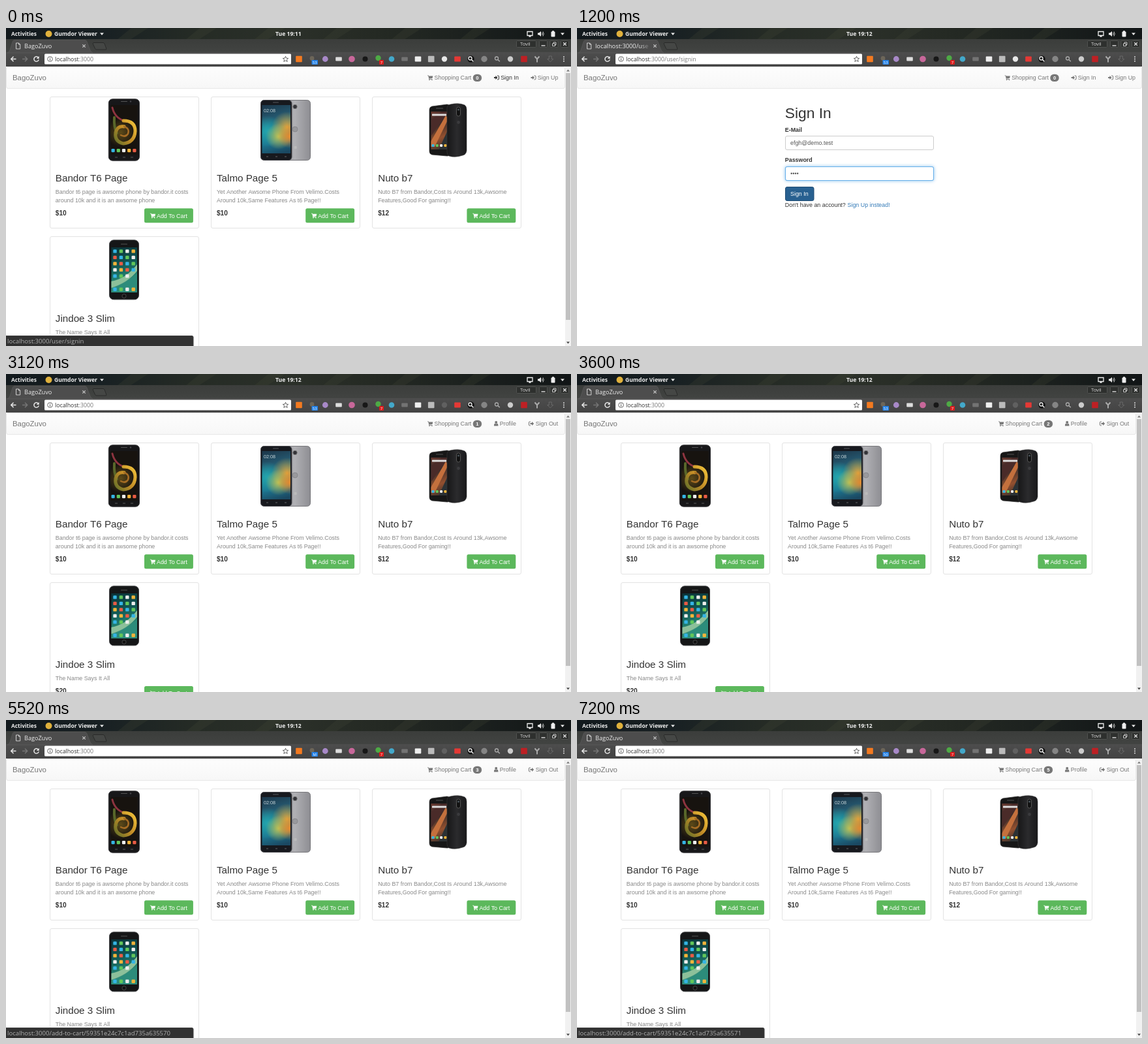
These frames come from a looping animation (866x487 px, 8 s). An HTML page with a canvas:

```html
<!DOCTYPE html>
<html lang="en">
<head>
<meta charset="utf-8">
<title>BagoZuvo</title>
<style>
  html, body { margin: 0; width: 100%; height: 100%; overflow: hidden; background: #fff; }
  canvas { display: block; }
</style>
</head>
<body>
<canvas id="stage" width="866" height="487"></canvas>
<script>
const c = document.getElementById('stage').getContext('2d');
const SANS = '"Liberation Sans", Arial, sans-serif';
const UI = '"Open Sans", "Noto Sans", sans-serif';
const LOOP = 8000, STEP = 1200;
const ADD = '/add-to-cart/59351e24c7c1ad735a63557';

const states = [
  { cart: 0, clock: '19:11', badge: '53', status: '/user/signin', hover: true },
  { cart: 0, clock: '19:12', badge: '53', form: true },
  { cart: 1, clock: '19:12', badge: '53', user: true },
  { cart: 2, clock: '19:12', badge: '53', user: true },
  { cart: 3, clock: '19:12', badge: 'M', user: true, status: ADD + '0' },
  { cart: 4, clock: '19:12', badge: '51', user: true },
  { cart: 5, clock: '19:12', badge: '50', user: true, status: ADD + '1' }
];

function text(s, x, y, size = 8.88, color = '#333', weight = 400, family = SANS) {
  c.font = `${weight} ${size}px ${family}`;
  c.fillStyle = color;
  c.fillText(s, x, y);
}
const ui = (s, x, y, size, color, weight) => text(s, x, y, size, color, weight, UI);

function box(x, y, w, h, r, fill, stroke) {
  c.beginPath();
  c.roundRect(x, y, w, h, r);
  paint(fill, stroke);
}
function dot(x, y, r, fill, stroke, width) {
  c.beginPath();
  c.arc(x, y, r, 0, 7);
  paint(fill, stroke, width);
}
function shape(d, x, y, fill, stroke, width) {
  c.save();
  c.translate(x, y);
  const path = new Path2D(d);
  if (fill) { c.fillStyle = fill; c.fill(path); }
  if (stroke) { c.strokeStyle = stroke; c.lineWidth = width || 1; c.stroke(path); }
  c.restore();
}
function paint(fill, stroke, width = 1) {
  if (fill) { c.fillStyle = fill; c.fill(); }
  if (stroke) { c.strokeStyle = stroke; c.lineWidth = width; c.stroke(); }
}
function blend(x0, y0, x1, y1, ...colors) {
  const g = c.createLinearGradient(x0, y0, x1, y1);
  colors.forEach((color, i) => g.addColorStop(i / (colors.length - 1), color));
  return g;
}
function glow(x, y, r, color) {
  const g = c.createRadialGradient(x, y, 0, x, y, r);
  g.addColorStop(0, color);
  g.addColorStop(1, color + '00');
  c.fillStyle = g;
  c.fillRect(x - r, y - r, 2 * r, 2 * r);
}
function clipped(x, y, w, h, draw) {
  c.save();
  c.beginPath();
  c.rect(x, y, w, h);
  c.clip();
  draw();
  c.restore();
}

// Small interface icons, centred on y
function cartIcon(x, y, color) {
  shape('M0-3.6H1.6L2.2-2.6H8.3L7.5 .9L2.8 1.5L3 2H7.4V2.7H2.2L2.1 1L1.2-2.8H0Z', x, y, color);
  dot(x + 3, y + 3.5, .8, color);
  dot(x + 6.9, y + 3.5, .8, color);
}
function enterIcon(x, y, color) {
  shape('M0-1.1H2.4V-3L5.5 0L2.4 3V1.1H0Z', x, y, color);
  shape('M5-2.9H6.5Q7.5-2.9 7.5-1.9V1.9Q7.5 2.9 6.5 2.9H5', x, y, null, color);
}
function leaveIcon(x, y, color) {
  shape('M2.5-1.1H5V-3L8.2 0L5 3V1.1H2.5Z', x, y, color);
  shape('M3-2.9H1.5Q.5-2.9 .5-1.9V1.9Q.5 2.9 1.5 2.9H3', x, y, null, color);
}
function userIcon(x, y, color) {
  dot(x + 3.2, y - 1.9, 2, color);
  shape('M0 3.6V2Q.2 0 1.5-.2Q3.2 1 4.9-.2Q6.2 0 6.4 2V3.6Z', x, y, color);
}
function lens(x, y, color) {
  dot(x - 1, y - 1, 2.5, null, color, 1.3);
  shape('M1 1L3.8 3.8', x, y, null, color, 1.6);
}

function topBar(s) {
  c.fillStyle = blend(0, 0, 866, 0, '#12191d', '#182023', '#252b25', '#2b3029', '#242923', '#1b201e', '#111516');
  c.fillRect(0, 0, 866, 18);
  clipped(0, 0, 866, 18, () => {
    for (let x = 170; x < 800; x += 105)
      shape('M0 18L22 0H48L20 18Z', x, 0, 'rgba(70,76,58,.22)');
  });
  ui('Activities', 8, 12, 8.4, '#eee', 700);
  dot(65.5, 9, 5, '#e0b13c');
  ui('Gumdor Viewer', 74, 12, 8.5, '#eee', 700);
  shape('M-3-1.5H3L0 2Z', 147, 9, '#eee');
  ui('Tue ' + s.clock, 413, 12, 8.6, '#eee', 700);
  shape('M-4-3.5H4V2.5H-4ZM-1.5 4H1.5', 803, 9, null, '#eee', 1.3);
  shape('M-5-1.5H-3L0-4V4L-3 1.5H-5Z', 820, 9, '#eee');
  shape('M1.5-2Q3 0 1.5 2M3-3.5Q5.5 0 3 3.5', 820, 9, null, '#ccc');
  box(835.5, 5.5, 6, 8, 1, '#eee');
  box(837, 4.3, 3, 2, 0, '#eee');
  shape('M-3-1.5H3L0 2Z', 853, 9, '#eee');
}

function tabStrip(s) {
  c.fillStyle = blend(0, 17, 0, 38, '#3b3d3b', '#424442');
  c.fillRect(0, 17, 866, 21);
  c.fillStyle = blend(0, 37, 0, 59, '#4d4d4d', '#434343');
  c.fillRect(0, 37, 866, 22);
  shape('M2 38Q5 37 6 34L10 21Q11 18.5 13 18.5H121Q123 18.5 124 21L129 34Q130 37 133 38Z', 0, 0, '#4d4d4d', '#5c5c5c', .7);
  shape('M134 22.5H149Q150 22.5 151 24L154 32Q154 33 153 33H139Q137 33 136.5 31.5L133 24Z', 0, 0, '#454745', '#242524', .8);
  shape('M-3-4.5H1L3.2-2.3V4.5H-3ZM1-4.5V-2.3H3.2', 18.5, 27.5, null, '#ddd', .9);
  if (s.form)
    ui('localhost:3000/use', 28, 30.5, 9.3, blend(96, 0, 111, 0, '#eee', '#666'));
  else
    ui('BagoZuvo', 28, 30.5, 9.1, '#eee');
  shape('M-2.2-2.2L2.2 2.2M2.2-2.2L-2.2 2.2', 119.5, 27.5, null, '#ccc', 1.1);

  box(782.5, 19.5, 30, 10, 1, '#2e302e', '#505250');
  ui('Tovil', 788, 27.4, 7.6, '#ddd');
  [823.5, 840, 856.5].forEach(x => box(x - 6, 19.5, 12, 10, 1, '#2e302e', '#505250'));
  shape('M-3 2H3', 823.5, 25, null, '#ddd', 1.4);
  shape('M-2.5-.5H1.5V3H-2.5ZM-1-.5V-2.5H3V1.5H1.5', 840, 24.5, null, '#ddd', .9);
  shape('M-2.3-2.3L2.3 2.3M2.3-2.3L-2.3 2.3', 856.5, 24.5, null, '#ddd', 1.3);
}

function toolbar(s) {
  shape('M4 0H-3.5M0-3.7L-3.7 0L0 3.7', 11.5, 47.5, null, '#e8e8e8', 1.5);
  shape('M-4 0H3.5M0-3.7L3.7 0L0 3.7', 29, 47.5, null, '#757575', 1.5);
  shape('M3-2.3A3.7 3.7 0 1 0 3.7 .8', 46.5, 47.5, null, '#e8e8e8', 1.5);
  shape('M4.2-4.4V-.5H.3Z', 46.5, 47.5, '#e8e8e8');
  box(59, 39.5, 378, 16, 1.5, '#fff');
  dot(67.5, 47.5, 3.8, null, '#555', .9);
  shape('M0-2.2V-1.1M0-.3V2.2', 67.5, 47.5, null, '#555', 1.1);
  ui('localhost', 75, 50.8, 8.75, '#333');
  const width = c.measureText('localhost').width;
  ui(':3000' + (s.form ? '/user/signin' : ''), 75 + width, 50.8, 8.75, '#777');
  shape('M0-4.2L1.2-1.3L4.2-1.1L1.9 .9L2.7 4L0 2.3L-2.7 4L-1.9 .9L-4.2-1.1L-1.2-1.3Z', 428.5, 47.5, null, '#555', .9);

  const square = (x, color, h = 9.6) => box(x - 4.8, 47.5 - h / 2, 9.6, h, 1, color);
  square(449, '#f47a20');
  dot(469, 46.5, 3.4, '#6d6659');
  box(468.5, 49, 9.5, 7, 1, '#2482e8');
  ui(s.badge, s.badge.length > 1 ? 469.8 : 470.5, 54.8, 6, '#fff');
  dot(489.3, 47.5, 4.4, '#a889c8');
  square(510, '#ddd', 6);
  dot(530, 47.5, 4.8, '#c8679a');
  dot(550.5, 47.5, 4, '#171717');
  dot(570.5, 46, 4.2, '#4eaa45');
  box(572, 49, 7, 7, 1, '#dc1d1d');
  ui('7', 573.8, 54.8, 6, '#fff');
  dot(591, 47.5, 4.3, '#43a8ca');
  square(611, '#737373', 6);
  square(631.5, '#eee', 8);
  square(651.7, '#bbb');
  dot(672, 47.5, 4.2, s.user ? '#606060' : '#e8e8e8');
  square(692, '#e53935', 8);
  dot(712.5, 47.5, 5.2, '#111');
  lens(712.5, 47.5, '#eee');
  dot(733, 47.5, 4.7, '#858585');
  lens(753, 47.5, '#aaa');
  dot(773, 47.5, 4.2, '#ccc');
  square(794, '#bd2024');
  shape('M-3.5-4L0 0L3.5-4M0 0V5', 814, 47.5, null, '#aaa', 2);
  shape('M-2-4.5H2V0H4.5L0 4.5L-4.5 0H-2Z', 834.3, 47.5, null, '#686868');
  [-3.3, 0, 3.3].forEach(d => dot(855, 47.5 + d, 1, '#ddd'));
}

function navBar(s) {
  const shift = s.form ? 9.6 : 0, y = 76;
  box(.5, 59.5, s.form ? 865 : 856, 33, 2.5, blend(0, 59, 0, 93, '#fdfdfd', '#f7f7f7'), '#e7e7e7');
  text('BagoZuvo', 10, 80, 11.4, '#777');
  c.save();
  c.translate(shift, 0);
  cartIcon(646, y, '#777');
  text('Shopping Cart', 656.6, 79.3, 8.88, '#777');
  box(715.7, 70.7, 13.4, 11.4, 5.7, '#777');
  text(s.cart, 720.3, 79.1, 7.6, '#fff', 700);
  if (s.user) {
    userIcon(748, y, '#777');
    text('Profile', 756.8, 79.3, 8.88, '#777');
    leaveIcon(801, y, '#777');
    text('Sign Out', 811.7, 79.3, 8.88, '#777');
  } else {
    const color = s.hover ? '#333' : '#777';
    enterIcon(748, y, color);
    text('Sign In', 758.2, 79.3, 8.88, color);
    enterIcon(804.5, y, '#777');
    text('Sign Up', 814.8, 79.3, 8.88, '#777');
  }
  c.restore();
}

function appDots(x, y, columns, rows, dx, dy, size) {
  const colors = ['#35b5e5', '#eee', '#e85b45', '#62c75a', '#f2b53a'];
  for (let i = 0; i < columns * rows; i++)
    box(x + i % columns * dx, y + Math.floor(i / columns) * dy, size, size, 1.2, colors[i * 3 % 5]);
}

function swirlPhone() {
  box(157.3, 108.8, 47.2, 94.4, 6, '#171719', '#3b3b3d');
  clipped(160, 118, 42, 76, () => {
    c.fillStyle = '#17130f';
    c.fillRect(160, 118, 42, 76);
    glow(176, 160, 22, '#5d4a18');
    c.lineCap = 'round';
    shape('M163 122Q167 139 184 143', 0, 0, null, '#8e3440', 3);
    shape('M166 137Q165 152 170 161', 0, 0, null, '#59672a', 4);
    shape('M180 142Q198 142 198 158Q197 175 180 177Q166 174 168 160Q171 149 181 151', 0, 0, null,
      blend(164, 172, 198, 146, '#627029', '#c08a26', '#edbe38'), 5);
    shape('M181 151Q190 154 187 162Q183 168 176 164', 0, 0, null, '#a56c24', 2.5);
    c.lineCap = 'butt';
  });
  appDots(161.5, 185, 5, 1, 8.2, 0, 5.2);
  box(176, 112, 10, 1, .5, '#555');
  dot(191, 112.5, 1.2, '#45454a');
  shape('M167 198H171M179 198H183M191 198H195', 0, 0, null, '#777', .7);
}

function sunsetPhone() {
  box(418, 110.5, 48.5, 92, 5, blend(418, 0, 467, 0, '#96969a', '#b0b0b4', '#8d8d92'), '#77777b');
  dot(443, 120.5, 3.2, '#333338', '#777');
  dot(443, 155, 4, '#99999d', '#88888c');
  box(441.5, 181, 4, 4, .5, '#bbb');
  box(390.5, 110.5, 47.5, 92, 5, '#17191e', '#4c4c51');
  clipped(392.5, 118, 43.5, 74, () => {
    c.fillStyle = blend(400, 118, 420, 192, '#1d394c', '#24556c', '#1a8296', '#1c7590', '#1b4861');
    c.fillRect(392, 118, 44, 74);
    glow(400, 158, 24, '#24a4ad');
    glow(431, 152, 24, '#e3a23a');
    glow(418, 166, 20, '#bfc255');
    glow(434, 166, 18, '#e58a2e');
    text('02:08', 395, 129, 7.2, '#c7d6da');
  });
  box(409, 113.5, 9, 1, .5, '#57585c');
  shape('M399 197H402M413 197H416M427 197H430', 0, 0, null, '#777', .8);
}

function twinPhone() {
  shape('M653 120L676 117Q682 118 682 123V191Q681 196 676 196L653 194Q649 193 649 189V125Q649 121 653 120Z', 0, 0, '#171717', '#333', .7);
  clipped(651.5, 128, 26, 58, () => {
    c.fillStyle = blend(651, 128, 678, 186, '#6b3a30', '#332a29', '#94502f', '#252a2d');
    c.fillRect(651, 127, 28, 60);
    shape('M651 141L669 127H679L651 166Z', 0, 0, '#4a2b29');
    shape('M651 174L674 134L678 139L657 182H651Z', 0, 0, '#c4703d');
    shape('M663 187L679 152V187Z', 0, 0, '#2b3134');
    box(653, 131.5, 22, 3, .5, '#ddd');
    appDots(652.5, 178, 4, 1, 6.3, 0, 4);
  });
  box(659, 122.5, 11, 1, .5, '#555');
  shape('M681 117Q694 114 703 118Q706 120 706 125V188Q705 194 700 195Q688 199 679 196Q676 194 676 190V123Q676 118 681 117Z', 0, 0, blend(676, 0, 706, 0, '#171718', '#2b2b2d', '#19191b'), '#3a3a3a', .6);
  box(690.5, 121, 6, 14, 3, '#111', '#555');
  dot(693.5, 125, 1.6, '#465057');
  dot(693.5, 144.5, 2.4, '#3b3b3e');
}

function wavePhone() {
  box(158.5, 324.8, 45, 91, 6.5, '#151617', '#414345');
  clipped(161.5, 336, 39.5, 69, () => {
    c.fillStyle = blend(168, 336, 190, 405, '#0b343a', '#105250', '#248170', '#7db795');
    c.fillRect(161, 336, 40, 70);
    shape('M161 388Q184 384 201 362V372Q187 390 161 398Z', 0, 0, '#8cc09a');
    shape('M161 399Q185 391 201 376V405H161Z', 0, 0, '#2c8c7b');
    appDots(164.3, 339.2, 4, 4, 9.4, 9.5, 5.4);
    appDots(164.3, 377.2, 3, 1, 9.4, 0, 5.4);
    appDots(164.3, 397.6, 4, 1, 9.4, 0, 5.4);
  });
  box(176, 330.5, 10, 1, .5, '#555');
  dot(181, 410.5, 3.1, '#111', '#555', .8);
}

const products = [
  { x: 67, y: 105, name: 'Bandor T6 Page', price: '$10', phone: swirlPhone,
    lines: ['Bandor t6 page is awsome phone by bandor.it costs', 'around 10k and it is an awsome phone'] },
  { x: 314.2, y: 105, name: 'Talmo Page 5', price: '$10', phone: sunsetPhone,
    lines: ['Yet Another Awsome Phone From Velimo.Costs', 'Around 10k,Same Features As t6 Page!!'] },
  { x: 561.4, y: 105, name: 'Nuto b7', price: '$12', phone: twinPhone,
    lines: ['Nuto B7 from Bandor,Cost Is Around 13k,Awsome', 'Features,Good For gaming!!'] },
  { x: 67, y: 319.4, name: 'Jindoe 3 Slim', price: '$20', phone: wavePhone,
    lines: ['The Name Says It All'] }
];

function card({ x, y, name, price, phone, lines }) {
  box(Math.round(x) + .5, Math.round(y) + .5, 228, 201, 2.5, '#fff', '#e3e3e3');
  phone();
  text(name, x + 8.8, y + 130.4, 15.2);
  lines.forEach((line, i) => text(line, x + 8.8, y + 149.4 + i * 12.7, 8.88, '#888'));
  const foot = y + 158.7 + (lines.length - 1) * 12.7;
  text(price, x + 8.8, foot + 10.6, 10.1, '#333', 700);
  box(x + 145, foot - .1, 74.9, 22, 2.5, '#5cb85c');
  cartIcon(x + 153.8, foot + 10.9, '#fff');
  text('Add To Cart', x + 164, foot + 14.3, 8.88, '#fff');
}

function scrollBar() {
  c.fillStyle = '#f1f1f1';
  c.fillRect(857, 59, 9, 428);
  c.fillStyle = '#c1c1c1';
  c.fillRect(858, 69, 7, 378);
  shape('M-2.5 1.5H2.5L0-1.5Z', 861.5, 65, '#777');
  shape('M-2.5-1.5H2.5L0 1.5Z', 861.5, 482, '#444');
}

function signInForm() {
  text('Sign In', 318.8, 138.2, 22.8);
  text('E-Mail', 318.8, 158.6, 8.88, '#333', 700);
  box(319.5, 165.5, 227, 21, 2.5, '#fff', '#ccc');
  text('efgh@demo.test', 327, 179, 8.88, '#555');
  text('Password', 318.8, 205.4, 8.88, '#333', 700);
  c.save();
  c.shadowColor = 'rgba(102,175,233,.7)';
  c.shadowBlur = 5;
  box(319.5, 212.5, 227, 21, 2.5, '#fff', '#66afe9');
  c.restore();
  box(319.5, 212.5, 227, 21, 2.5, '#fff', '#66afe9');
  for (let i = 0; i < 4; i++) dot(328.7 + i * 3.15, 222.7, 1.2, '#555');
  box(319.5, 243.5, 43.5, 21, 2.5, '#286090', '#204d74');
  text('Sign In', 327, 257, 8.88, '#fff');
  text("Don't have an account?", 318.8, 274);
  text('Sign Up instead!', 414.5, 274, 8.88, '#337ab7');
}

function statusBubble(path) {
  box(-1, 471.5, 288, 17, [0, 2, 0, 0], '#323232', '#414141');
  ui('localhost:3000' + path, 2, 482.6, 9.55, '#b0b0b0');
}

function render(s) {
  c.fillStyle = '#fff';
  c.fillRect(0, 0, 866, 487);
  topBar(s);
  tabStrip(s);
  toolbar(s);
  navBar(s);
  if (s.form) signInForm();
  else {
    products.forEach(card);
    scrollBar();
  }
  if (s.status) statusBubble(s.status);
}

const start = performance.now();
function tick() {
  const time = (performance.now() - start) % LOOP;
  render(states[Math.floor(time / STEP)]);
  requestAnimationFrame(tick);
}
tick();
</script>
</body>
</html>
```
